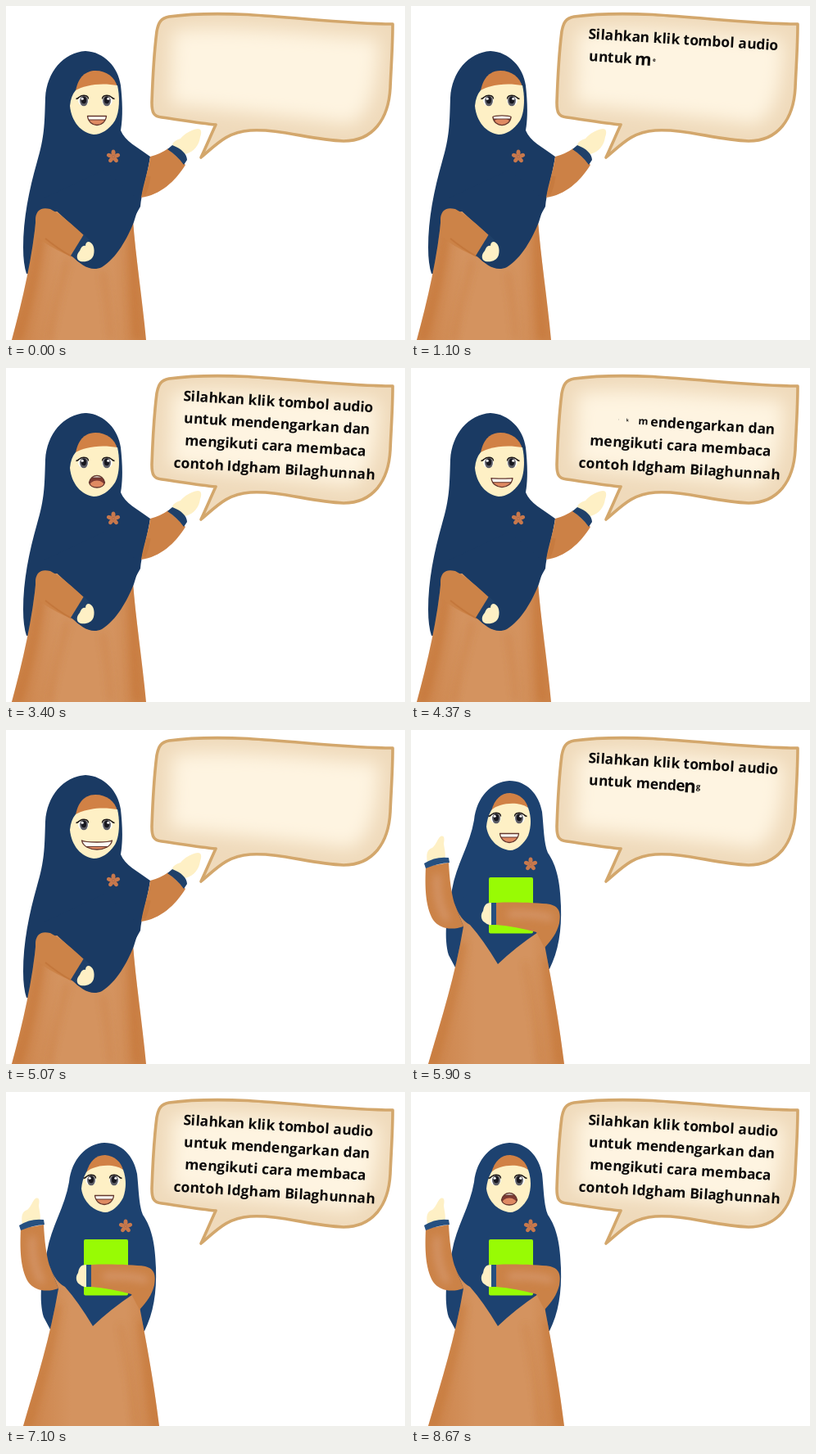
Animation of 487 by 408 pixels, one loop 8.71 s. Source, as an HTML page:

```html
<!DOCTYPE html>
<html lang="id">
<head>
<meta charset="utf-8">
<style>
html, body { margin: 0; width: 100%; height: 100%; overflow: hidden; background: #fff; }
svg { position: absolute; left: 0; top: 0; }
#speech {
  position: absolute; left: 180px; top: 26.5px; width: 300px;
  font: 700 17.4px/27.2px "Open Sans", "Noto Sans", sans-serif;
  color: #0c0a0a; text-align: center; white-space: pre; transform: rotate(3.5deg);
}
#speech span { display: inline-block; }
</style>
</head>
<body>
<svg width="487" height="408" viewBox="0 0 487 408">
  <defs>
    <filter id="soft" x="-30%" y="-30%" width="160%" height="160%"><feGaussianBlur stdDeviation="5"/></filter>
    <filter id="glow" x="-20%" y="-30%" width="140%" height="160%"><feGaussianBlur stdDeviation="11"/></filter>
    <linearGradient id="cloth">
      <stop offset="0" stop-color="#cc8248"/><stop offset=".35" stop-color="#d4935f"/>
      <stop offset=".75" stop-color="#d4935f"/><stop offset="1" stop-color="#cc8248"/>
    </linearGradient>
    <path id="bubble" d="M184 31C186 20 189 15 199 13C225 9.500 262 9 295 10.500C360 14.500 420 22 472 22C472 50 470 75 469 100C467 138 448 165 412 165C370 163 335 150 298 152C270 154 258 168 238 185C245 170 250 158 256 145C235 143 212 139 190 136C180 135 178 130 178 118C179 88 181 55 184 31Z"/>
    <clipPath id="inBubble"><use href="#bubble"/></clipPath>
    <path id="dress1" d="M37 255C33 305 20 360 7 408H171C166 355 158 305 155 262L100 245Z"/>
    <clipPath id="inDress1"><use href="#dress1"/></clipPath>
    <path id="dress2" d="M53 212L64 240C54 300 38 350 21 408H187C180 350 170 300 163 262L155 240Z"/>
    <clipPath id="inDress2"><use href="#dress2"/></clipPath>
    <clipPath id="inMouth"><path class="lips"/></clipPath>
    <g id="eye">
      <ellipse rx="6.300" ry="6" fill="#fff"/>
      <ellipse cx=".5" rx="4.900" ry="6.300" fill="#5c5d66"/>
      <ellipse cx=".5" cy="-1" rx="3.100" ry="4.300" fill="#17171f"/>
      <circle cx="-1.300" cy="-2.800" r="1.500" fill="#fff"/>
      <path d="M-9-2.500Q-6.500-3-5.500-4.500Q-1-8 4-6Q6-5 6-2.500" fill="none" stroke="#1b1616" stroke-width="1.500"/>
    </g>
    <g id="flower" fill="#c8784c"></g>
  </defs>

  <use href="#bubble" fill="#efdabb"/>
  <g clip-path="url(#inBubble)">
    <path d="M203 30C280 22 380 36 455 40Q455 130 420 145C350 135 290 130 200 120Z" fill="#fef4e1" filter="url(#glow)"/>
  </g>
  <use href="#bubble" fill="none" stroke="#d3a76c" stroke-width="3.600" stroke-linejoin="round"/>

  <g id="girl1">
    <path fill="#1a3a63" d="M97 55C70 57 50 80 48 112C47 145 47 160 38 190C28 225 21 260 21 295Q21 315 25 327L60 330L150 270L164 245C165 230 172 210 176 184C160 172 145 165 140 152C143 135 142 115 140 97C137 75 120 56 97 55Z"/>
    <use href="#dress1" fill="url(#cloth)"/>
    <g clip-path="url(#inDress1)" fill="none" stroke="#c47535" filter="url(#soft)" opacity=".6">
      <path d="M44 260Q38 330 14 408M155 265Q155 340 160 408" stroke-width="11"/>
      <path d="M75 310Q62 360 52 408M118 325Q126 370 128 408" stroke-width="3"/>
    </g>
    <path fill="#1a3a63" d="M45 235L95 281L80 305C92 317 104 325 117 319C135 308 148 284 156 264L164 238L120 200Z"/>
    <path fill="#cc8348" d="M36 262C36 250 42 245 54 248C68 255 82 268 95 280L80 306C65 300 50 292 38 282Z"/>
    <path fill="none" stroke="#bf7135" stroke-width="2" opacity=".6" d="M48 284Q64 297 80 306"/>
    <path fill="#1f4069" d="M95 279L102 286L89 311L79 305Z"/>
    <path fill="#fef0c5" d="M100 288C106 288 109 296 107 304C105 311 98 313 91 312C85 310 86 303 90 299C92 294 94 292 97 293Q97 289 100 288Z"/>
    <path fill="#cc8146" d="M176 184Q188 181 198 174L219 194C207 214 188 231 165 234C168 216 174 200 176 184Z"/>
    <path fill="none" stroke="#bd6d33" stroke-width="5" opacity=".3" d="M174 208Q172 222 168 230"/>
    <path fill="#fef0c5" d="M203 171C203 166 207 164 213 162C218 156 226 151 234 150C239 150 239 155 237 160C236 169 230 178 219 181Z"/>
    <path fill="#1f4069" d="M197 175L203 170C214 174 221 181 221 188L217 194C211 186 205 180 197 175Z"/>
    <path fill="#d18145" d="M85 104C88 86 98 79 109 79C123 79 133 87 136 99Z"/>
    <path fill="#fef0c5" d="M85 103C95 97 115 93 136 97C139 110 139 129 133 140C126 151 116 157 107 157C92 155 80 142 78 122Q79 110 85 103Z"/>
    <use href="#flower" x="131" y="184"/>
  </g>

  <g id="girl2">
    <path fill="#1d4270" d="M120 62C98 63 80 82 77 110C72 140 55 165 50 195C43 225 40 255 46 275L55 292H169C180 270 184 245 183 215C182 185 178 166 167 150C162 138 162 118 160 100C156 78 141 62 120 62Z"/>
    <use href="#dress2" fill="url(#cloth)"/>
    <g clip-path="url(#inDress2)" fill="none" stroke="#c57736" filter="url(#soft)" opacity=".6">
      <path d="M62 260Q52 330 26 408M166 280Q174 340 182 408" stroke-width="9"/>
      <path d="M140 285Q152 350 158 408" stroke-width="3"/>
    </g>
    <path fill="#1d4270" d="M53 212Q60 232 72 238Q88 256 106 286Q128 265 155 247L150 200H70Z"/>
    <path fill="#cb8247" d="M18 167L46 162C47 182 49 198 53 212L64 240C50 245 35 243 27 232C17 215 17 190 18 167Z"/>
    <path fill="#fef0c5" d="M20 163C18 150 20 146 26 144C31 140 32 133 36 130C41 128 41 133 40 139C41 147 43 153 41 159Z"/>
    <path fill="#265080" d="M16 163Q30 154 46 156L47 162Q32 163 18 169Z"/>
    <rect x="95" y="180" width="54" height="68.500" rx="2" fill="#98fb04"/>
    <path fill="#cb8247" d="M104 211C125 210 155 211 170 213C182 216 183 225 181 236C178 248 172 256 163 266L153 247Q128 240 104 238Z"/>
    <g fill="none" stroke="#d6966a" stroke-width="9" stroke-linecap="round" filter="url(#soft)" opacity=".9">
      <path d="M32 180Q31 210 43 230M122 225Q150 224 169 229"/>
    </g>
    <path fill="#265080" d="M96 211H104V238H96Z"/>
    <path fill="#fef0c5" d="M98 211C90 211 89 216 88 221C84 226 86 233 90 235Q94 239 98 238Z"/>
    <path fill="#d18145" d="M98 99C102 84 110 77 121 77C133 78 141 86 143 96Z"/>
    <path fill="#fef0c5" d="M98 98C106 90 130 86 143 95C147 106 147 118 143 129C138 139 129 147 121 147C107 146 94 134 92 118Q93 107 98 98Z"/>
    <use href="#flower" x="146" y="164"/>
  </g>

  <g id="face">
    <g id="eyes">
      <use href="#eye" x="-15.500"/>
      <use href="#eye" x="-13.500" transform="scale(-1 1)"/>
    </g>
    <g id="mouth" transform="translate(1 23)">
      <g clip-path="url(#inMouth)">
        <rect x="-22" y="-12" width="44" height="26" fill="#7d3a32"/>
        <ellipse id="tongue" fill="#df8a62"/>
        <rect id="teeth" x="-22" y="-12" width="44" fill="#fffdf6" stroke="#63372e"/>
      </g>
      <path class="lips" fill="none" stroke="#63372e" stroke-width="1.300" stroke-linejoin="round"/>
    </g>
  </g>
</svg>
<div id="speech"></div>

<script>
const LOOP = 8710, SECOND = 5270, FREEZE = 5070;
const LINES = ["Silahkan klik tombol audio", "untuk mendengarkan dan",
  "mengikuti cara membaca", "contoh Idgham Bilaghunnah"];
const BLINKS = [960, 1780, 2600, 3480, 4240, 4900, 6700, 7500], BLINK_MS = 110;

// half width, corner y, top y, bottom y, lower edge of the teeth
const SMILE = [11.5, -4.5, -4.5, 6.5, 0], WIDE = [18.5, -4, -2, 7, 3.5], OPEN = [9.5, 1, -7.5, 7, -5];
const TALK_MS = 610;
const TALK = [[0, SMILE], [.14, SMILE], [.26, WIDE], [.34, WIDE], [.46, OPEN], [.62, OPEN], [.85, SMILE], [1, SMILE]];

const $ = id => document.getElementById(id);
const clamp = v => Math.max(0, Math.min(1, v));
const set = (el, attrs) => { for (const k in attrs) el.setAttribute(k, attrs[k]); };

const letters = [];
let index = 0;
LINES.forEach((line, n) => {
  for (const ch of line) {
    if (ch === " ") $("speech").append(" ");
    else {
      const el = document.createElement("span");
      el.textContent = ch;
      $("speech").append(el);
      letters.push({ el, i: index });
    }
    index++;
  }
  if (n < LINES.length - 1) $("speech").append("\n");
});

$("flower").innerHTML = [0, 72, 144, 216, 288].map(a =>
  `<ellipse cy="-4.8" rx="2.5" ry="3.6" transform="rotate(${a})"/>`).join("") + '<circle r="1.8"/>';

const pop = u => u < .5 ? 2.6 * u : 1.3 - .6 * (u - .5);

function drawText(t, second) {
  const step = second ? 16.2 : 32.5, start = second ? 5 : 15, length = second ? 50 : 100;
  for (const { el, i } of letters) {
    let s = pop(clamp((t - start - i * step) / length));
    if (!second) s *= 1 - clamp((t - 4020 - i * 10.5) / 50);
    el.style.transform = `scale(${s})`;
  }
}

function drawMouth(t) {
  const p = t % TALK_MS / TALK_MS;
  const k = TALK.findIndex(key => key[0] > p);
  const [p0, from] = TALK[k - 1], [p1, to] = TALK[k];
  const [w, c, top, bottom, teeth] = from.map((v, i) => v + (to[i] - v) * (p - p0) / (p1 - p0));
  const bend = y => (y - c / 4) / .75;
  const d = `M${-w} ${c}C${-w * .75} ${bend(top)} ${w * .75} ${bend(top)} ${w} ${c}` +
    `C${w * .85} ${bend(bottom)} ${-w * .85} ${bend(bottom)} ${-w} ${c}Z`;
  document.querySelectorAll(".lips").forEach(el => set(el, { d }));
  set($("teeth"), { height: teeth + 12 });
  set($("tongue"), { cy: bottom - 1, rx: w, ry: 7.5 });
}

function draw() {
  const now = performance.now() % LOOP;
  const second = now >= SECOND;
  const t = second ? now - SECOND : Math.min(now, FREEZE);
  $("girl1").style.display = second ? "none" : "";
  $("girl2").style.display = second ? "" : "none";
  set($("face"), { transform: second ? "translate(119 108)" : "translate(110 116)" });
  const blink = BLINKS.find(b => now >= b && now < b + BLINK_MS);
  const lid = blink ? 1 - .9 * Math.sin(Math.PI * (now - blink) / BLINK_MS) : 1;
  set($("eyes"), { transform: `scale(1 ${lid})` });
  drawMouth(t);
  drawText(t, second);
  requestAnimationFrame(draw);
}
draw();
</script>
</body>
</html>
```
